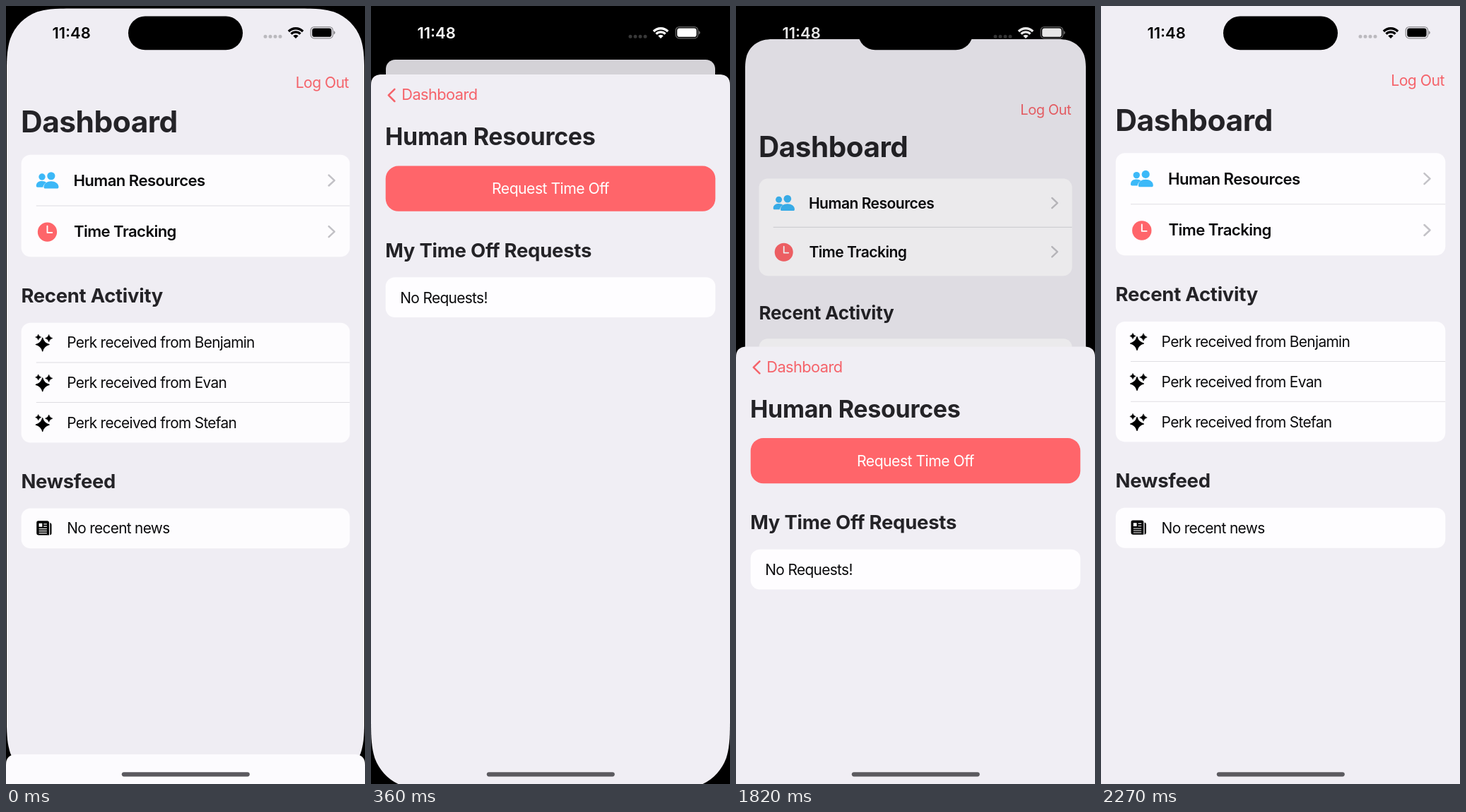
These frames come from a looping animation (508x1102 px, 2420 ms). An HTML page:

```html
<!DOCTYPE html>
<html lang="en">
<head>
<meta charset="utf-8">
<title>Dashboard sheet</title>
<style>
  html, body { margin: 0; height: 100%; overflow: hidden; background: #000; }
  svg { display: block; width: 100vw; height: 100vh; }
  text { font: 400 20.9px Inter, "Liberation Sans", sans-serif; font-optical-sizing: none; letter-spacing: -.032em; fill: #0a0a0c; }
  .large { font-size: 42.6px; font-weight: 700; letter-spacing: -.012em; fill: #242327; }
  .title { font-size: 34px; font-weight: 700; letter-spacing: -.009em; fill: #242327; }
  .head { font-size: 27.5px; font-weight: 700; letter-spacing: -.009em; fill: #242327; }
  .row { font-size: 22.2px; font-weight: 600; letter-spacing: -.025em; }
  .act { font-size: 21.2px; letter-spacing: -.025em; fill: #f5636a; }
  .back { font-size: 21.8px; letter-spacing: -.027em; fill: #f5636a; }
  .clock { font-size: 22px; font-weight: 600; letter-spacing: 0; fill: currentColor; }
  .card { fill: #fefdff; }
  .line { fill: none; stroke: #dfdee3; stroke-width: 1.1; }
  .chev { fill: none; stroke: #c3c2c7; stroke-width: 2.5; stroke-linecap: round; stroke-linejoin: round; }
</style>
</head>
<body>
<svg viewBox="0 0 508 1102" preserveAspectRatio="none">
  <defs>
    <clipPath id="clip"><path id="mask"/></clipPath>
    <path id="star" d="M0-10Q2-2 10 0Q2 2 0 10Q-2 2-10 0Q-2-2 0-10Z" stroke="#000" stroke-width="1.2" stroke-linejoin="round"/>
    <g id="sparkles">
      <use href="#star" transform="translate(51 478) scale(.95)"/>
      <use href="#star" transform="translate(45 467.5) scale(.42)"/>
      <use href="#star" transform="translate(60 469) scale(.52)"/>
    </g>
  </defs>
  <rect width="508" height="1102"/>

  <g id="home" clip-path="url(#clip)">
    <rect width="508" height="1102" fill="#f0eef4"/>
    <text class="act" x="485.8" y="113" text-anchor="end">Log Out</text>
    <text class="large" x="20.3" y="176.5">Dashboard</text>

    <rect class="card" x="20.8" y="208.3" width="466.5" height="145" rx="13"/>
    <path class="line" d="M42 280.8H487.3"/>
    <g fill="#3cb9f8">
      <circle cx="50.3" cy="239.6" r="4.7"/>
      <path d="M42 252.5C42 247.5 46 245.6 50.3 245.6C53 245.6 55 246.4 56.4 247.6C53.6 249.4 52 251.8 51.6 254.4H44C42.7 254.4 42 253.8 42 252.5Z"/>
      <circle cx="63.2" cy="238.4" r="5.6"/>
      <path d="M52.8 254C52.8 249 57.4 245.8 63.2 245.8S73.8 249 73.8 254C73.8 255.5 73 256.3 71.6 256.3H55C53.6 256.3 52.8 255.5 52.8 254Z"/>
    </g>
    <text class="row" x="94.9" y="252.6">Human Resources</text>
    <path class="chev" d="M457.5 237.2L465.5 244.7L457.5 252.2"/>
    <circle cx="57.8" cy="318" r="13.7" fill="#ff656a"/>
    <path d="M57.8 309.5V318.9H64.6" fill="none" stroke="#fff" stroke-width="1.9" stroke-linecap="round" stroke-linejoin="round"/>
    <text class="row" x="95.4" y="325.4">Time Tracking</text>
    <path class="chev" d="M457.5 310L465.5 317.5L457.5 325"/>

    <text class="head" x="20.6" y="418">Recent Activity</text>
    <rect class="card" x="20.8" y="447" width="466.5" height="170.4" rx="13"/>
    <path class="line" d="M42 503.5H487.3M42 560.3H487.3"/>
    <use href="#sparkles"/>
    <use href="#sparkles" y="57"/>
    <use href="#sparkles" y="114"/>
    <text x="85.6" y="482.7">Perk received from Benjamin</text>
    <text x="85.6" y="539.6">Perk received from Evan</text>
    <text x="85.6" y="596.5">Perk received from Stefan</text>

    <text class="head" x="20.6" y="682">Newsfeed</text>
    <rect class="card" x="20.8" y="710.7" width="466.5" height="57" rx="13"/>
    <path d="M45 728.6H57.5Q60.3 728.6 60.3 731.4V748.8H45.5Q42.5 748.8 42.5 745.8V731.4Q42.5 728.6 45 728.6ZM61.6 731.4Q63.8 731.8 63.8 734V746.6Q63.6 748.6 61.6 748.8Z"/>
    <path d="M45.8 732.2H50.6V737H45.8Z" fill="#fff"/>
    <path d="M52.6 733.2H57.2M52.6 736.5H57.2M45.8 740H57.2M45.8 743H57.2M45.8 746H57.2" stroke="#fff" stroke-width="1.2"/>
    <text x="85.6" y="746.8">No recent news</text>

    <rect id="dim" width="508" height="1102"/>
  </g>

  <rect x="173" y="14.4" width="162" height="47.8" rx="23.9"/>

  <g id="sheet">
    <path id="panel"/>
    <g id="content">
      <path class="chev" style="stroke:#f5636a" d="M33.4 20.8L24.8 29.4L33.4 38"/>
      <text class="back" x="43.3" y="36.4">Dashboard</text>
      <text class="title" x="20" y="100.3">Human Resources</text>
      <rect x="20.7" y="129.6" width="466.6" height="64.2" rx="18" fill="#ff656a"/>
      <text class="act" x="254" y="169.4" text-anchor="middle" style="fill:#fff">Request Time Off</text>
      <text class="head" x="20.2" y="258.8">My Time Off Requests</text>
      <rect class="card" x="20.7" y="287.2" width="466.6" height="56.8" rx="13"/>
      <text x="41.3" y="323.6">No Requests!</text>
    </g>
  </g>

  <g id="status" fill="currentColor">
    <text class="clock" x="92.6" y="46" text-anchor="middle">11:48</text>
    <path d="M367 43.2H388.5" fill="none" stroke="currentColor" stroke-width="5" stroke-linecap="round" stroke-dasharray="0 7" opacity=".22"/>
    <g fill="none" stroke="currentColor">
      <path d="M399.9 36A14.2 14.2 0 0 1 420.1 36" stroke-width="3.4"/>
      <path d="M403.5 39.6A9.2 9.2 0 0 1 416.5 39.6" stroke-width="3.2"/>
      <rect x="431.2" y="29.6" width="31.4" height="16.2" rx="5" stroke-width="1.3" opacity=".4"/>
    </g>
    <path d="M410 46L406.3 42.3A5.2 5.2 0 0 1 413.7 42.3Z"/>
    <rect x="433.2" y="31.6" width="27.4" height="12.2" rx="3.4"/>
    <path d="M463.8 35Q465.8 36 465.8 37.8T463.8 40.6Z" opacity=".45"/>
  </g>
  <rect x="163.8" y="1085.2" width="181" height="6.2" rx="3.1" fill="#5b5a5f"/>
</svg>
<script>
const $ = id => document.getElementById(id);
const LOOP = 2420, OPEN = -17.5, CLOSE = 1746.6, STEP = 30;
const SCREEN_R = 71, CARD_R = 13;

// critically damped spring from 0 to 1
const spring = ms => {
  const x = Math.max(0, ms) * .0183;
  return 1 - (1 + x) * Math.exp(-x);
};
const smooth = u => {
  u = Math.min(1, Math.max(0, u));
  return u * u * (3 - 2 * u);
};

// continuous corner of radius 1: Bezier points from the left edge to the top edge
const HALF = [[0, 1.528], [0, 1.088], [0, .868], [.075, .631], [.169, .373]];
const CORNER = [...HALF, ...HALF.map(([x, y]) => [y, x]).reverse()];

// full-width panel with top corner radius a and bottom corner radius b
function panel(h, a, b) {
  const w = 508;
  const corner = (r, right, bottom) => {
    const pts = CORNER.map(([x, y]) => [right ? w - x * r : x * r, bottom ? h - y * r : y * r]);
    if (right !== bottom) pts.reverse();
    return `${pts[0]}C${pts.slice(1).join(' ')}`;
  };
  return `M${corner(a, false, false)}L${corner(a, true, false)}` +
    `L${corner(b, true, true)}L${corner(b, false, true)}Z`;
}

function draw(now) {
  let t = now % LOOP;
  const base = t < 1730 ? 0 : 1730;
  t = base + Math.floor((t - base) / STEP) * STEP;

  const settled = t >= 480 && t < CLOSE, closed = t >= 2270;
  const p = settled ? 1 : closed ? 0 : t < CLOSE ? spring(t - OPEN) : 1 - spring(t - CLOSE);
  const scale = 1 - .0827 * p;
  const r = closed ? 0 : SCREEN_R + (CARD_R - SCREEN_R) * p;

  $('home').setAttribute('transform', `translate(${254 * (1 - scale)} ${76.5 * p}) scale(${scale})`);
  $('mask').setAttribute('d', panel(1102, r / scale, r / scale));
  $('dim').setAttribute('opacity', .12 * p);

  $('sheet').setAttribute('transform', `translate(0 ${1102 - 1013 * p})`);
  $('panel').setAttribute('d', panel(1013, CARD_R, settled ? 0 : SCREEN_R));
  $('panel').setAttribute('fill', t < STEP ? '#fcfbfe' : '#f0eef4');
  $('content').style.display = t < STEP ? 'none' : '';

  const light = smooth((t - OPEN) / 400) - smooth((t - CLOSE) / 400);
  const c = Math.round(255 * light);
  $('status').style.color = `rgb(${c},${c},${c})`;
}

let start;
function tick(now) {
  start ??= now;
  draw(now - start);
  requestAnimationFrame(tick);
}
draw(0);
requestAnimationFrame(tick);
</script>
</body>
</html>
```
